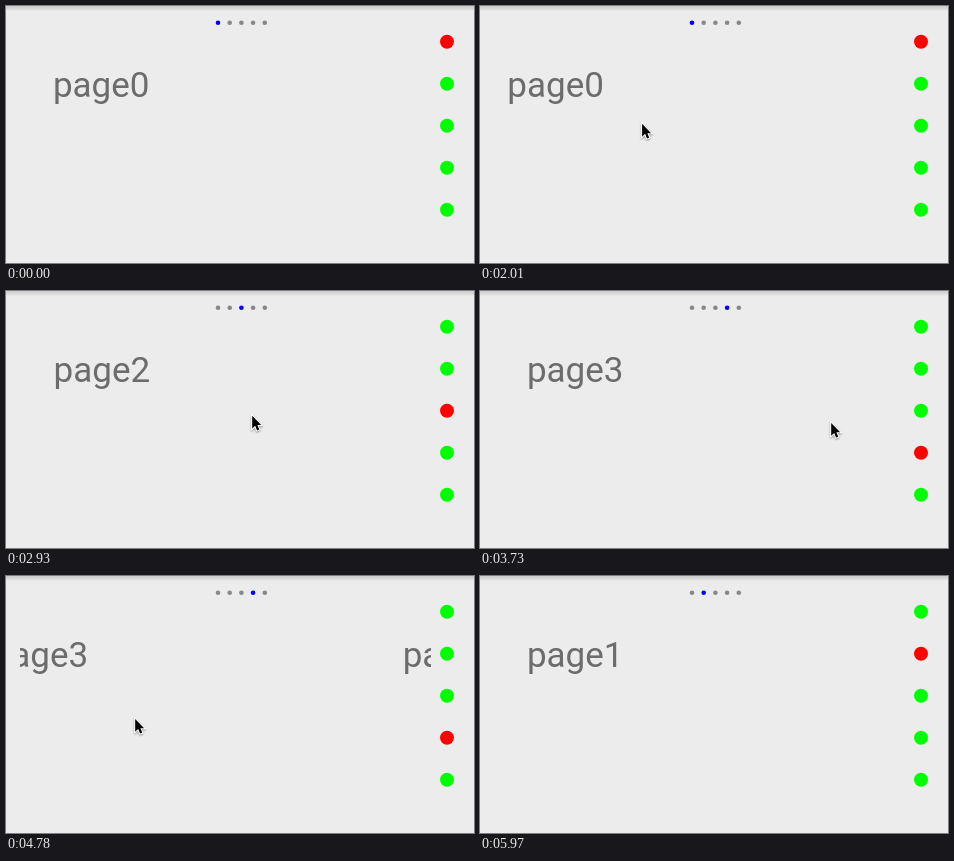
An HTML page with a canvas for the animation above (6300 ms loop, 468 by 257 pixels).

```html
<!DOCTYPE html>
<html lang="en">
<head>
<meta charset="utf-8">
<title>Pager with indicators</title>
<style>
  html, body { margin: 0; width: 468px; height: 257px; overflow: hidden; background: #ececec; }
  canvas { display: block; }
</style>
</head>
<body>
<canvas id="stage" width="468" height="257"></canvas>
<script>
const ctx = document.getElementById('stage').getContext('2d');
const LOOP = 6300, LEFT = 14, PAGE = 411, COUNT = 5;
const ENTER = 360, ARRIVE = 1000, EXIT = 5705, GONE = 5845;
const HOVER = 150, HOLD = 160, REACH = 178, SETTLE = 290;

// Swipes: press time, pointer x, pages turned
const swipes = [
  [1320, 185, 0], [1978, 180.5, 1], [2570, 215, 1], [3165, 245, 1],
  [3810, 350, 1], [4553, 30, -1], [5060, 22, -1], [5545, 30, -1]
];

function glide(a, b, t, start, duration) {
  const u = Math.min(1, Math.max(0, (t - start) / duration));
  return a + (b - a) * u * u * (3 - 2 * u);
}

// The pointer hovers to each press point, then drags the pages along;
// on release they settle with a quintic ease-out.
function stateAt(t) {
  let x = glide(318, 14, t, ENTER, ARRIVE - ENTER);
  let page = 0, scroll = 0, free = ARRIVE;
  for (const [press, from, step] of swipes) {
    if (t < free) break;
    x = glide(x, from, t, free, HOVER);
    if (t < press) break;
    const moved = glide(0, step < 0 ? REACH : -REACH, t, press, HOLD);
    x += moved;
    scroll = page * PAGE - moved;
    free = press + HOLD;
    if (t >= free) {
      page += step;
      const rest = Math.max(0, 1 - (t - free) / SETTLE);
      scroll = page * PAGE + (scroll - page * PAGE) * rest ** 5;
    }
  }
  // The hand sinks slowly, and comes and goes at the bottom edge
  const s = Math.max(0, t - ARRIVE) / 1000;
  const y = 111 + 5.2 * s + 0.8 * s * s
    + glide(110, 0, t, ENTER, ARRIVE - ENTER) + glide(0, 110, t, EXIT, GONE - EXIT);
  return { page, scroll, x, y };
}

function dot(x, y, r, color) {
  ctx.fillStyle = color;
  ctx.beginPath();
  ctx.arc(x, y, r, 0, 2 * Math.PI);
  ctx.fill();
}

const arrow = new Path2D('M0 0V12.8L3 10L4.9 14.6L7.1 13.7L5.2 9.3H9Z');

function drawPointer(x, y) {
  ctx.save();
  ctx.translate(x + 1.2, y + 0.8);
  ctx.shadowColor = 'rgba(0,0,0,.4)';
  ctx.shadowBlur = 2;
  ctx.shadowOffsetY = 1;
  ctx.strokeStyle = '#fff';
  ctx.lineWidth = 2;
  ctx.stroke(arrow);
  ctx.shadowColor = 'transparent';
  ctx.fillStyle = '#000';
  ctx.fill(arrow);
  ctx.restore();
}

const shade = ctx.createLinearGradient(0, 0, 0, 5);
shade.addColorStop(0, '#cecece');
shade.addColorStop(0.4, '#d3d3d3');
shade.addColorStop(1, '#ececec');

function draw(t) {
  const { page, scroll, x, y } = stateAt(t);
  ctx.fillStyle = '#ececec';
  ctx.fillRect(0, 0, 468, 257);
  ctx.fillStyle = shade;
  ctx.fillRect(0, 0, 468, 5);

  ctx.save();
  ctx.beginPath();
  ctx.rect(LEFT, 0, PAGE, 257);
  ctx.clip();
  ctx.font = '35px Roboto, sans-serif';
  ctx.fillStyle = '#6c6c6c';
  for (let i = 0; i < COUNT; i++) ctx.fillText('page' + i, 46.9 + i * PAGE - scroll, 90.5);
  ctx.restore();

  for (let i = 0; i < COUNT; i++) {
    dot(212 + 11.7 * i, 16.7, 2.3, i === page ? '#00f' : '#888');
    dot(441, 35.7 + 42 * i, 7, i === page ? '#f00' : '#0f0');
  }

  if (t >= ENTER && t < GONE) drawPointer(x, y);
}

const start = performance.now();
function tick() {
  draw((performance.now() - start) % LOOP);
  requestAnimationFrame(tick);
}
tick();
</script>
</body>
</html>
```
